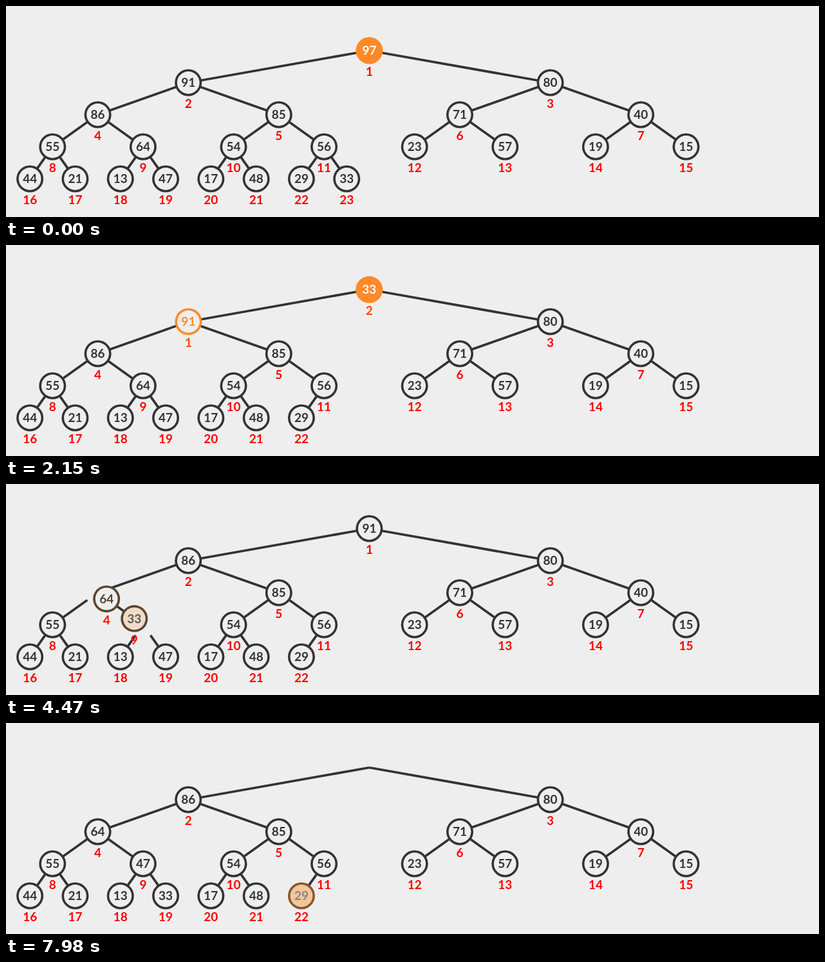
Write an HTML page that moves like this. It is 1263x329 px and loops after 8 s.

```html
<!DOCTYPE html>
<html lang="en">
<head>
<meta charset="utf-8">
<title>Heap: extract max</title>
<style>
  html, body { margin: 0; width: 100%; height: 100%; overflow: hidden; background: #eee; }
  svg { display: block; width: 100%; height: 100%; }
  text { font: 700 19px Lato, "Open Sans", sans-serif; text-anchor: middle; }
  line { stroke: #333; stroke-width: 3.75; }
</style>
</head>
<body>
<svg id="stage" viewBox="0 0 1263 329"></svg>
<script>
const LOOP = 8000, MOVE = 500, HALF = 508, CYCLE = 1017, FIRST = 1105;
const VALUES = [97, 91, 80, 86, 85, 71, 40, 55, 64, 54, 56, 23, 57, 19, 15,
                44, 21, 13, 47, 17, 48, 29, 33];
const PATH = [23, 1, 2, 4, 9, 19];   // slots the sinking key passes through
const RADIUS = 21, CORE = 17.4, GAP = 20, FONT = 19;
const DARK = [51, 51, 51], PALE = [238, 238, 238], ORANGE = [255, 138, 39],
      WHITE = [255, 255, 255], RED = [255, 0, 0], WARM = [255, 74, 0];

// The picture refreshes in bursts: first time, last time, number of steps.
const BURSTS = [[0, 0, 1], [150, 920, 11], [990, 990, 1], [1150, 1920, 11], [1990, 1990, 1],
  [2150, 2450, 5], [2700, 3000, 5], [3160, 3940, 11], [4010, 4010, 1], [4170, 4930, 11],
  [5010, 5090, 2], [5240, 5480, 4], [5680, 5710, 2], [6800, 7120, 5], [7260, 7980, 10]];
const TICKS = BURSTS.flatMap(([a, b, n]) =>
  Array.from({ length: n }, (_, i) => n > 1 ? a + (b - a) * i / (n - 1) : a));

const stage = document.getElementById('stage');

function add(parent, tag) {
  return parent.appendChild(document.createElementNS(stage.namespaceURI, tag));
}

function set(el, attrs) {
  for (const key in attrs) el.setAttribute(key, attrs[key]);
}

const lerp = (a, b, k) => a + (b - a) * k;
const mix = (a, b, k) => `rgb(${a.map((v, i) => Math.round(lerp(v, b[i], k)))})`;
const between = (a, b, k) => ({ x: lerp(a.x, b.x, k), y: lerp(a.y, b.y, k) });

function progress(t, start) {
  const k = Math.min(1, Math.max(0, (t - start) / MOVE));
  return k < 0.5 ? 4 * k ** 3 : 1 - 4 * (1 - k) ** 3;
}

function spot(slot) {
  const level = Math.floor(Math.log2(slot)), width = 2 ** level;
  return { x: 2 + 1124.8 * (slot - width + 0.5) / width, y: 69.5 + 50 * level };
}

function toward(a, b, dist) {
  return between(a, b, dist / Math.hypot(b.x - a.x, b.y - a.y));
}

const [edgeLayer, nodeLayer, textLayer] = [0, 1, 2].map(() => add(stage, 'g'));
const edges = VALUES.slice(1).map(() => add(edgeLayer, 'line'));
const nodes = VALUES.map(value => {
  const node = {
    ring: add(nodeLayer, 'circle'), core: add(nodeLayer, 'circle'),
    key: add(textLayer, 'text'), label: add(textLayer, 'text')
  };
  node.key.textContent = value;
  return node;
});

function pose(t) {
  const items = VALUES.map((_, i) =>
    ({ slot: i + 1, ...spot(i + 1), core: 0, rim: 0, size: 1, warm: 0 }));
  const light = (item, k) => { item.core = item.rim = k; };
  const travel = (item, from, to, k) =>
    Object.assign(item, between(spot(from), spot(to), k), { slot: to });

  const sinking = items[22];
  light(items[0], 1);
  items[0].size = 1 - progress(t, FIRST - 2 * HALF);
  light(sinking, progress(t, FIRST - HALF));
  if (t >= FIRST) travel(sinking, 23, 1, progress(t, FIRST));

  for (let k = 1; k < 5; k++) {
    const swap = FIRST + CYCLE * k, from = PATH[k], to = PATH[k + 1];
    if (t < swap - HALF) break;
    const child = items[to - 1], m = progress(t, swap);
    const lit = progress(t, swap - HALF) * (1 - m);
    light(sinking, k === 1 ? 1 - m : lit);
    child.rim = lit;
    if (t >= swap) {
      travel(sinking, from, to, m);
      travel(child, to, from, m);
      sinking.warm = child.warm = 1 - m;
    }
  }

  if (t > 6730) light(items[1], progress(t, 6730));
  items[1].size = 1 - progress(t, 7238);
  light(items[21], progress(t, 7746));
  return items;
}

function drawEdges(t) {
  const gone = progress(t, FIRST);
  const rootGap = GAP * (1 - progress(t, FIRST - 2 * HALF) + gone - progress(t, 7238));
  edges.forEach((line, i) => {
    const slot = i + 2, a = spot(slot >> 1), b = spot(slot);
    let p = toward(a, b, slot < 4 ? rootGap : GAP), q = toward(b, a, GAP);
    if (slot === 23) {
      const end = toward(a, spot(1), GAP);
      p = between(p, end, gone);
      q = between(q, end, gone);
      set(line, { visibility: gone < 1 ? 'visible' : 'hidden' });
    }
    set(line, { x1: p.x, y1: p.y, x2: q.x, y2: q.y });
  });
}

function drawNode(node, { slot, x, y, core, rim, size, warm }) {
  set(node.ring, { cx: x, cy: y, r: RADIUS * size, fill: mix(DARK, ORANGE, rim) });
  set(node.core, { cx: x, cy: y, r: CORE * size, fill: mix(PALE, ORANGE, core) });
  set(node.key, { x, y: y + 6.7 * size, fill: mix(DARK, core ? WHITE : ORANGE, rim) });
  set(node.label, { x, y: y + 33 + 6.7 * size, fill: mix(RED, WARM, warm) });
  node.label.textContent = slot;
  for (const el of [node.key, node.label]) {
    el.style.fontSize = FONT * size + 'px';
    el.style.visibility = size > 0.02 ? 'visible' : 'hidden';
  }
}

function draw(now) {
  const time = now % LOOP;
  const t = TICKS.filter(tick => tick <= time + 8).pop();
  drawEdges(t);
  pose(t).forEach((item, i) => drawNode(nodes[i], item));
}

const begin = performance.now();
function loop() {
  draw(performance.now() - begin);
  requestAnimationFrame(loop);
}
loop();
</script>
</body>
</html>
```
